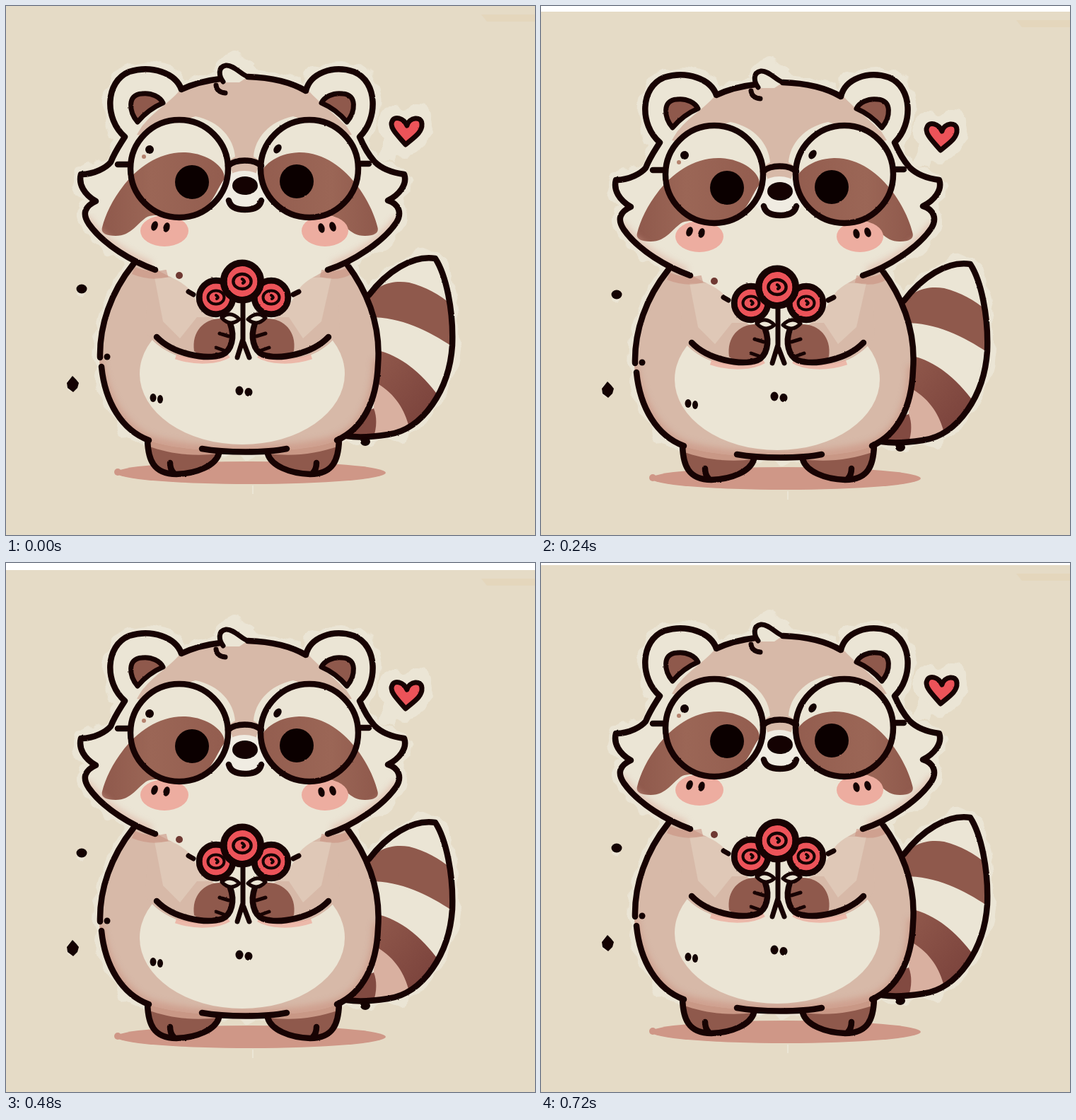
Animation, 748 px wide and 748 px high, one loop 800 ms. Source, as an HTML page:

```html
<!DOCTYPE html>
<html lang="en">
<head>
<meta charset="utf-8">
<title>Raccoon with roses</title>
<style>
  html, body { margin: 0; width: 100%; height: 100%; overflow: hidden; background: #fff; }
  svg { display: block; width: 100%; height: 100%; overflow: hidden; }
  #scene { animation: bob 800ms step-end infinite; }
  @keyframes bob {
    0%, 100% { transform: translateY(0); }
    10%, 90% { transform: translateY(3px); }
    20%, 80% { transform: translateY(6px); }
    30%, 70% { transform: translateY(8px); }
    40%, 60% { transform: translateY(10px); }
    50% { transform: translateY(10.5px); }
  }
  .ink { fill: none; stroke: #170303; stroke-width: 8.5; stroke-linecap: round; stroke-linejoin: round; }
  .mid { stroke-width: 7; }
  .thin { stroke-width: 5; }
  .dot { fill: #140202; stroke: none; }
  .cream { fill: #ebe5d5; }
  .tan { fill: #d7b9a8; }
  .brown { fill: #8f594c; }
  .pink { fill: #edada0; }
  .red { fill: #ec5359; }
  .halo { fill: #ebe5d5; stroke: #ebe5d5; stroke-linejoin: round; }
</style>
</head>
<body>
<svg viewBox="0 0 748 748">
  <defs>
    <filter id="rough" filterUnits="userSpaceOnUse" x="0" y="0" width="748" height="748" color-interpolation-filters="sRGB">
      <feTurbulence type="fractalNoise" baseFrequency=".28" numOctaves="1" seed="4"/>
      <feDisplacementMap in="SourceGraphic" scale="2" xChannelSelector="R" yChannelSelector="G"/>
    </filter>
    <filter id="ragged" filterUnits="userSpaceOnUse" x="0" y="0" width="748" height="748" color-interpolation-filters="sRGB">
      <feTurbulence type="fractalNoise" baseFrequency=".04" numOctaves="2" seed="9"/>
      <feDisplacementMap in="SourceGraphic" scale="20" xChannelSelector="R" yChannelSelector="G"/>
    </filter>
    <filter id="soft"><feGaussianBlur stdDeviation="5"/></filter>
    <linearGradient id="patch" x1="0" x2="1">
      <stop offset="0" stop-color="#8f594c"/><stop offset=".4" stop-color="#9b6656"/><stop offset="1" stop-color="#935d4f"/>
    </linearGradient>
    <linearGradient id="stripe" x1="0" y1="0" x2="1" y2="1">
      <stop offset="0" stop-color="#91594c"/><stop offset="1" stop-color="#78403a"/>
    </linearGradient>
    <path id="head" d="M211 373C180 362 138 338 117 308C107 293 112 283 127 276C111 267 102 252 106 238C126 238 142 228 148 221C154 206 160 198 168 185C139 160 140 107 174 93C206 83 240 95 248 118C265 110 285 106 304 103C320 98 380 95 424 120C430 95 462 83 492 93C526 107 526 160 500 185C506 199 514 212 521 220C532 231 548 236 563 238C568 252 556 267 540 275C556 280 560 293 552 306C534 333 490 362 455 373Z"/>
    <path id="body" d="M180 364C148 405 131 452 132 500C136 558 162 598 202 614C250 634 420 636 468 614C506 598 526 560 527 505C530 456 512 406 482 364Z"/>
    <path id="tail" d="M513 409C538 376 574 352 607 357C622 380 633 430 631 480C627 542 590 599 540 606C514 610 494 610 482 608"/>
    <path id="foot" d="M200 612C200 640 207 662 241 662C270 661 297 650 302 630Z"/>
    <path id="heart" d="M565 196C556 185 541 172 546 163C549 155 562 158 567 169C570 157 588 155 588 167C589 179 575 187 565 196Z"/>
    <clipPath id="inHead"><use href="#head"/></clipPath>
    <clipPath id="inBody"><use href="#body"/></clipPath>
    <clipPath id="inTail"><use href="#tail"/></clipPath>
    <clipPath id="inFoot"><use href="#foot"/></clipPath>

    <path id="ear" d="M186 164C174 150 171 125 192 124C206 122 218 129 222 137C208 143 196 152 186 164Z"/>
    <path id="mask" fill="url(#patch)" d="M136 313C146 272 190 206 252 207C286 208 310 228 309 244C296 262 292 284 268 294C240 303 216 292 200 298C186 306 178 325 155 325C139 325 134 320 136 313Z"/>
    <path id="brow" class="cream" d="M178 235C178 192 208 164 245 163L268 156C302 163 322 187 324 213L306 224L260 260Z"/>
    <path id="paw" class="brown" d="M266 488C262 460 280 442 304 442C320 444 327 470 315 487C302 498 280 498 266 488Z"/>
    <g id="rose">
      <circle class="red" r="24"/>
      <circle class="ink" r="23" style="stroke-width:7"/>
      <ellipse class="ink" rx="11.500" ry="9.500" style="stroke-width:4"/>
      <path class="ink" d="M0-3Q5 0 1 2" style="stroke-width:4"/>
    </g>
    <path id="leg" d="M200 614C201 641 208 662 241 662C270 661 296 650 301 633M232 646Q232 655 237 660"/>
    <g id="arm">
      <path d="M213 468C236 492 282 501 306 493C319 487 324 468 317 449"/>
      <path class="thin" d="M302 463L315 467M297 483L311 488"/>
    </g>
  </defs>

  <g id="scene">
  <rect width="748" height="760" fill="#e5dbc6"/>
  <path d="M672 12H748V22H680Z" fill="#e4d6bc"/>

  <g class="halo" filter="url(#ragged)">
    <use href="#head" stroke-width="22"/>
    <use href="#body" stroke-width="18"/>
    <use href="#tail" stroke-width="20"/>
    <use href="#heart" stroke-width="36"/>
    <path d="M300 100L318 78L345 95M530 200L555 210" stroke-width="26"/>
    <circle cx="107" cy="402" r="5"/><circle cx="94" cy="535" r="9"/>
  </g>

  <ellipse cx="346" cy="660" rx="191" ry="16" fill="#cf9787"/>
  <circle cx="158" cy="659" r="5" fill="#cf9787"/>
  <path d="M349 678V690" stroke="#ebe5d5" stroke-width="2"/>

  <use href="#tail" class="cream"/>
  <g clip-path="url(#inTail)">
    <path class="brown" d="M505 420C522 394 545 387 570 391C594 397 612 408 630 422L636 485C600 460 560 440 514 440Z"/>
    <path fill="#d9b0a0" d="M524 530C550 545 566 565 572 592L515 612Z"/>
    <path fill="url(#stripe)" d="M522 486C560 494 590 522 612 552C602 573 584 586 569 592C562 566 546 545 522 532Z"/>
    <path fill="#824a41" d="M482 612C492 590 507 573 520 569C526 585 523 600 519 612Z"/>
  </g>

  <g id="footFill">
    <use href="#foot" class="brown"/>
    <path clip-path="url(#inFoot)" fill="#c99886" d="M195 600V620C230 634 270 638 305 632V600Z"/>
  </g>
  <use href="#footFill" transform="matrix(-1 0 0 1 671 0)"/>

  <use href="#body" class="tan"/>
  <g clip-path="url(#inBody)">
    <path d="M128 500C138 570 175 606 205 617C270 636 400 636 468 616C505 600 527 560 528 500" fill="none" stroke="#c98f7e" stroke-width="18" opacity=".6" filter="url(#soft)"/>
    <ellipse class="cream" cx="334" cy="520" rx="145" ry="100"/>
    <path class="tan" d="M196 460C232 508 290 505 312 490L318 410H200ZM472 460C440 508 380 505 358 490L352 410H470Z"/>
    <path fill="#dfc8b7" d="M210 384H460L446 446L420 470L400 440H270L246 470L222 446Z"/>
    <path class="cream" d="M205 366C225 384 246 384 262 404C282 440 296 450 336 452C376 450 392 440 412 404C424 384 440 384 462 366Z"/>
    <path d="M240 496C270 506 300 503 315 494M432 496C402 506 372 503 357 494" fill="none" stroke="#eda799" stroke-width="7" opacity=".7"/>
    <path d="M180 374Q205 384 228 378M445 378Q470 384 486 374" fill="none" stroke="#c98f7e" stroke-width="11" opacity=".55"/>
  </g>

  <use href="#head" class="cream"/>
  <g clip-path="url(#inHead)">
    <path class="tan" d="M185 182C206 146 236 118 270 109Q340 92 410 110C440 120 468 146 489 182L385 200L352 222H324L290 200Z"/>
    <path class="cream" d="M145 80H250L246 119C230 138 210 148 195 167L150 190ZM523 80H424L427 119C444 138 460 148 478 167L520 190Z"/>
    <use href="#brow"/>
    <use href="#brow" transform="matrix(-1 0 0 1 674 0)"/>
    <path d="M316 225Q337 212 358 225L352 240H322Z" fill="#d7b9a8"/>
    <ellipse cx="337" cy="262" rx="36" ry="29" fill="#f0ece2"/>
    <use href="#mask"/>
    <use href="#mask" transform="matrix(-.96 0 0 1 656 0)"/>
    <path d="M112 300Q140 340 205 368M556 300Q520 345 462 368" fill="none" stroke="#dba999" stroke-width="12" opacity=".55" filter="url(#soft)"/>
    <ellipse class="pink" cx="224" cy="318" rx="34" ry="22"/>
    <ellipse class="pink" cx="451" cy="318" rx="33" ry="22"/>
  </g>
  <path class="cream" d="M306 108C300 92 305 84 314 84C326 87 330 95 342 100L330 108Z"/>
  <use href="#ear" class="brown"/>
  <use href="#ear" class="brown" transform="matrix(-1 0 0 1 668 0)"/>
  <use href="#paw"/>
  <use href="#paw" transform="matrix(-1 0 0 1 673 0)"/>
  <use href="#heart" class="red"/>

  <g class="ink" filter="url(#rough)">
    <use href="#tail"/>
    <path d="M180 365C148 405 132 452 133 497M135 510C140 560 164 600 202 614M482 365C514 408 530 456 526 507C524 560 504 598 468 614M277 626C310 632 368 632 397 626"/>
    <use href="#leg"/>
    <use href="#leg" transform="matrix(-1 0 0 1 671 0)"/>
    <path d="M211 373C180 362 138 338 117 308C107 293 112 283 127 276C111 267 102 252 106 238C126 238 142 228 148 221C154 206 160 198 168 185C139 160 140 107 174 93C206 83 240 95 248 118C265 110 285 105 303 103M342 100C372 101 400 106 424 120C430 95 462 83 492 93C526 107 526 160 500 185C506 199 514 212 521 220C532 231 548 236 563 238C568 252 556 267 540 275C556 280 560 293 552 306C534 333 490 362 455 373"/>
    <g class="mid">
      <path d="M342 100C331 96 322 83 311 84C299 86 301 99 307 107M297 112Q298 122 310 123"/>
      <use href="#ear"/>
      <use href="#ear" transform="matrix(-1 0 0 1 668 0)"/>
      <use href="#heart"/>
    </g>
    <circle cx="245" cy="230" r="69"/>
    <circle cx="429" cy="230" r="69"/>
    <path d="M314 226C325 216 350 216 361 226M158 224H173M500 223H513M315 275Q318 288 338 288Q358 288 361 275"/>
    <use href="#arm"/>
    <use href="#arm" transform="matrix(-1 0 0 1 669 0)"/>

    <path class="cream thin" d="M305 441Q317 430 330 443Q317 454 305 441ZM342 443Q355 430 367 441Q355 454 342 443Z"/>
    <path class="mid" d="M335 418V480M335 471L327 497M336 476L344 497"/>
    <use href="#rose" x="297" y="412"/>
    <use href="#rose" x="375" y="412"/>
    <use href="#rose" transform="translate(334 389.500) scale(1.1)"/>
    <path class="mid" d="M258 404L265 408M406 408L414 404"/>

    <g class="dot">
      <circle cx="263" cy="249" r="24" fill="#0b0000"/>
      <circle cx="411" cy="248" r="24" fill="#0b0000"/>
      <ellipse cx="338" cy="254" rx="18" ry="13"/>
      <circle cx="203" cy="203" r="6"/>
      <ellipse cx="384" cy="202" rx="5" ry="7" transform="rotate(35 384 202)"/>
      <ellipse cx="210" cy="311" rx="4.500" ry="7" transform="rotate(20 210 311)"/>
      <ellipse cx="227" cy="313" rx="4.500" ry="7" transform="rotate(15 227 313)"/>
      <ellipse cx="446" cy="314" rx="4.500" ry="7" transform="rotate(-15 446 314)"/>
      <ellipse cx="462" cy="312" rx="4.500" ry="7" transform="rotate(-20 462 312)"/>
      <ellipse cx="330" cy="544" rx="5.500" ry="6.500"/>
      <ellipse cx="343" cy="546" rx="5.500" ry="6"/>
      <ellipse cx="208" cy="554" rx="4.500" ry="6"/>
      <ellipse cx="218" cy="556" rx="4" ry="6"/>
      <ellipse cx="107" cy="400" rx="7.500" ry="6.500"/>
      <path d="M94 523L99 528L103 533L101 540L95 546L87 540L86 533L90 528Z"/>
      <circle cx="143" cy="496" r="4.500"/>
      <ellipse cx="508" cy="616" rx="7" ry="6"/>
    </g>
  </g>
  <circle cx="245" cy="381" r="5" fill="#6f3933"/>
  <circle cx="195" cy="213" r="3" fill="#b5836f"/>
  </g>
</svg>
</body>
</html>
```
